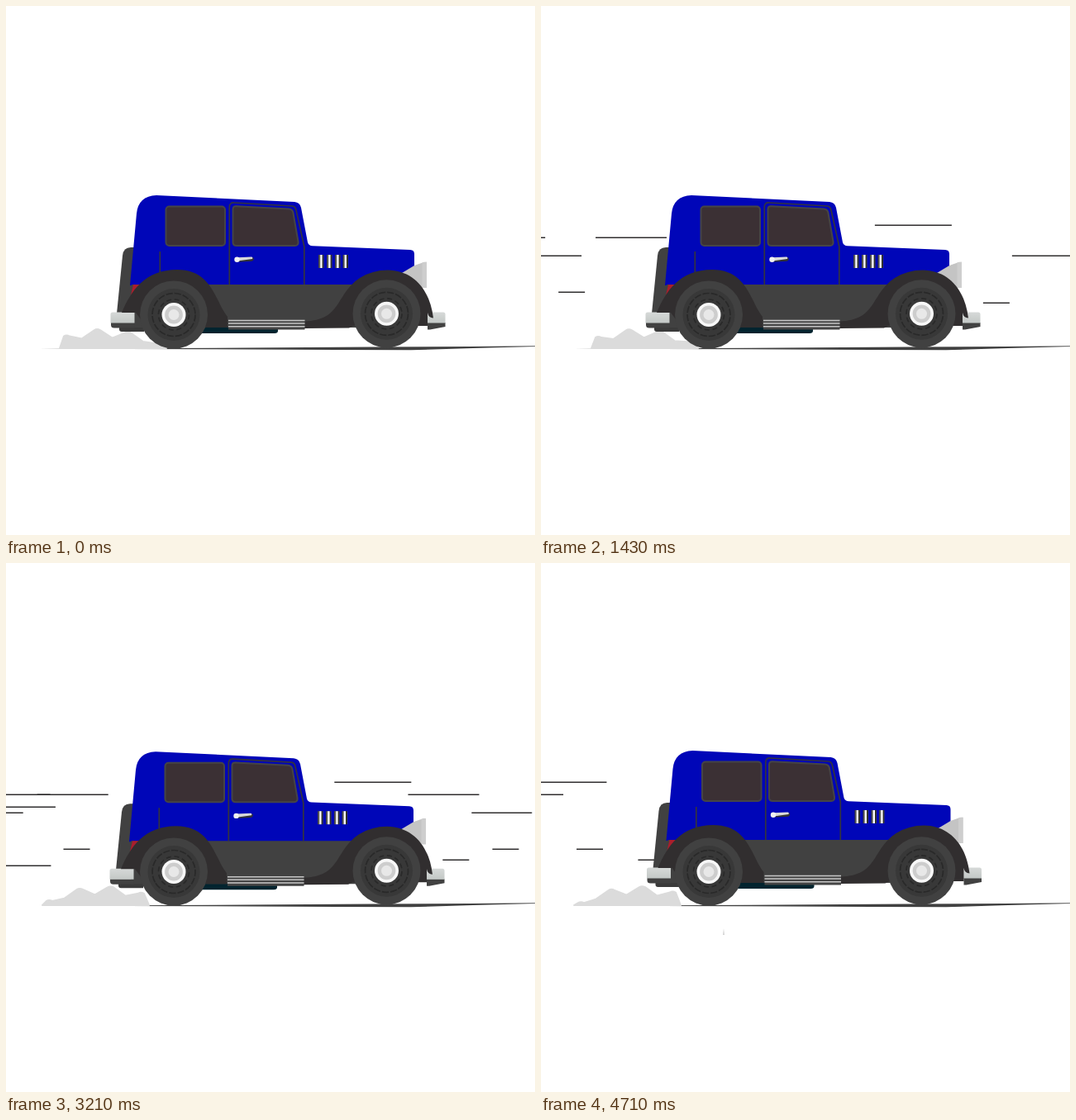
An HTML page for the animation above (4780 ms loop, 640 px wide and 640 px high).

```html
<!DOCTYPE html>
<html lang="en">
<head>
<meta charset="utf-8">
<title>Speeding car</title>
<style>
  html, body { margin: 0; height: 100%; overflow: hidden; background: #fff; }
  svg { display: block; width: 100%; height: 100%; }
</style>
</head>
<body>
<svg viewBox="0 0 640 640">
  <defs>
    <linearGradient id="chrome">
      <stop offset="0" stop-color="#333"/><stop offset=".25" stop-color="#666"/>
      <stop offset=".45" stop-color="#fff"/><stop offset=".65" stop-color="#fff"/>
      <stop offset=".75" stop-color="#222"/><stop offset="1" stop-color="#444"/>
    </linearGradient>
    <linearGradient id="bumper" x2="0" y2="1">
      <stop offset="0" stop-color="#d6d9d8"/><stop offset="1" stop-color="#c3c8c6"/>
    </linearGradient>
    <g id="wheel">
      <circle r="41" fill="#414141"/>
      <circle r="31.5" fill="#383838"/>
      <g class="spin" fill="none" stroke="#292929" stroke-width="1.7">
        <circle r="26" stroke-dasharray="8.2 2"/>
        <circle r="18.5" stroke-dasharray="6 3.7"/>
      </g>
      <circle r="14.5" fill="#f8f8f8"/>
      <circle r="8.7" fill="#e8e8e8" stroke="#cdcdcd" stroke-width="4.4"/>
    </g>
  </defs>

  <g id="lines" fill="none" stroke="#302e2f" stroke-width="1.4"></g>
  <path d="M40 414.7 L200 414 L440 412.5 L560 412 L640 411.3 V411.9 L565 414 L490 416.3 L400 416 L250 415.2Z" fill="#414141"/>
  <path id="smoke" fill="#dbdbdb" stroke="#dbdbdb" stroke-width="2" stroke-linejoin="round"/>
  <path id="fleck" fill="#d4d4d4"/>

  <g id="car">
    <path d="M236 388 H329 V393 Q329 396 325 396 H236Z" fill="#02242f"/>
    <path d="M137 388 H167 V394 H140 Q137 394 137 391Z" fill="#3a3a3a"/>
    <path d="M155 383 H166 V388 H155Z" fill="#312e2f"/>
    <path d="M134 372 L141 302 Q142 292 151 292 H160 V372Z" fill="#414141"/>
    <path d="M150 338 L158 251 Q160 230 182 229 L349 237 Q355.500 237.500 357 244 L365 286 Q366 290 371 290.300 L489 295 Q494 295.200 494 300 V338Z" fill="#0006b8"/>
    <path d="M152 337 H440 V389 H152Z" fill="#414141"/>
    <path d="M151 350 L154 337 H166Z" fill="#a91e2d"/>

    <g fill="#3b3034" stroke="#454447" stroke-width="2">
      <rect x="193.500" y="242.500" width="71.500" height="47.500" rx="4"/>
      <path d="M274.500 246 Q274.500 242 278.500 242.200 L342 245.500 Q346.500 246 347.300 249.500 L353.500 285 Q354 290 349.500 290 H279 Q274.500 290 274.500 286Z"/>
    </g>
    <path d="M186.300 297 V322 M270.300 337 V243 Q270.300 237.600 276 238 L346 242 Q350 242.300 351 247 L360.800 291 V337" fill="none" stroke="#34343f" stroke-width="1.700"/>
    <path d="M282 309.500 L297 308.800 Q300.500 308 299.500 304.500 L282 306Z" fill="#333"/>
    <path d="M280 304.300 L297 303.500 Q299 304 298 306 L280 308.500Z" fill="#d9d9d9"/>
    <circle cx="279.500" cy="306.700" r="3.200" fill="#f1f1f1"/>
    <g fill="url(#chrome)">
      <rect x="378" y="301" width="6.500" height="16"/><rect x="388" y="301" width="6.500" height="16"/>
      <rect x="398" y="301" width="6.500" height="16"/><rect x="407.500" y="301" width="6.500" height="16"/>
    </g>

    <path d="M479 323 L494 314 L506 309.700 H509 V341 H500Z" fill="#c4c4c4"/>
    <path d="M503.500 310.500 L509 309.700 V341 H503.500Z" fill="#cecece"/>
    <path d="M127 383 H155.500 V389.500 H131 Q127 389.500 127 386Z M510 383 H531.500 V388 L513 391.500 H510Z" fill="#414141"/>
    <path d="M126.500 383.500 V373 Q126.500 370.500 129 370.500 H155.500 V383.500Z M510 383.500 V370.500 H529 Q531.500 370.500 531.500 373 V383.500Z" fill="url(#bumper)"/>
    <g fill="#312e2f">
      <path d="M140 371 C151 345 168 319 207 319 C250 319 253 358 268 376 V389 H240 L166 383 L157 371Z"/>
      <path d="M361 390 V381.500 C407 380 398 349 428 329 Q443 319.500 462 319.500 C493 320 513 343 517 377.500 Q511 377 510 371 V387 H420 L415 389.500Z"/>
    </g>
    <path d="M269 379 H361.500 V391.500 H269Z" fill="#454545"/>
    <path d="M269 380.500 H361.500 M269 384 H361.500 M269 387.700 H361.500" stroke="#c6c6c6" stroke-width="1.500"/>
  </g>

  <use href="#wheel" x="203" y="373.500"/>
  <use href="#wheel" x="460.500" y="372.300"/>
</svg>

<script>
const LOOP = 4780, FRAMES = 67, BASE = 414;
const $ = selector => document.querySelector(selector);

// Each group of speed lines decelerates from the right edge; lines are [dx, y, length].
const groups = [
  { end: -130, span: 1100,
    starts: [-.47, 5.09, 12.55, 18.56, 23.21, 31.41, 36.56, 43.53, 51.17, 56, 61.67],
    lines: [[-166, 265.2, 93], [90, 280.2, 86], [0, 302.2, 73], [-35, 359.2, 32]] },
  { end: -60, span: 997,
    starts: [6.19, 12.01, 21.01, 28.41, 30.77, 38.5, 43.63, 52.1, 58.77],
    lines: [[-102, 280.2, 86], [0, 346.2, 32]] },
  { end: -110, span: 800,
    starts: [2.38, 7.84, 28.33, 38.5, 50.77, 55.5],
    lines: [[0, 295.2, 66], [-24.5, 366.2, 85]] }
];

// [step, dx, dy]
const bounce = [[0, 0, 0], [4, .5, -1], [8, 1, -2], [14, 1, -1.6], [20, 0, 0], [25, 0, -1.8],
  [29, .5, -2.7], [33, .5, -.8], [38, 0, -2], [45, -1, -.8], [52, -2.5, -2], [59, 0, -.8],
  [66, 1.5, -2], [67, 0, 0]];
// [step, distance drifted]
const drift = [[0, 0], [8, 76], [20, 189], [29, 277], [38, 365], [52, 491], [66, 617], [67, 629]];

function valueAt(keys, step, column) {
  const i = keys.findIndex(key => key[0] > step);
  const a = keys[i - 1], b = keys[i];
  return a[column] + (b[column] - a[column]) * (step - a[0]) / (b[0] - a[0]);
}

function speedLines(step) {
  let markup = '';
  for (const { end, span, starts, lines } of groups) {
    for (const start of starts) {
      const age = step - start;
      const opacity = Math.min(1, age, (9.75 - age) / 1.15);
      if (opacity <= 0) continue;
      const x = end + span * Math.exp(-.314 * age);
      const d = lines.map(([dx, y, length]) => `M${x + dx} ${y}h${length}`).join('');
      markup += `<path d="${d}" opacity="${opacity}"/>`;
    }
  }
  return markup;
}

const puffHeight = x => 24 * (1 - ((x - 115) / (x < 115 ? 75 : 84)) ** 2);

function smokePath(shift) {
  const gap = 37, peaks = [];
  for (let x = 110 - shift % gap - 3 * gap; x < 230; x += gap) {
    if (puffHeight(x) > 2) peaks.push(x);
  }
  let d = `M${peaks[0] - 8} ${BASE}`;
  peaks.forEach((x, i) => {
    const top = BASE - puffHeight(x) + 1;
    if (i) {
      const valley = x - gap / 2;
      d += `L${valley} ${BASE - .53 * puffHeight(valley)}`;
    }
    d += `L${x - 3} ${top + 1}Q${x} ${top - 1} ${x + 4} ${top + 1}`;
  });
  return d + `L${peaks.at(-1) + 10} ${BASE}Z`;
}

function fleckPath(phase) {
  if (phase > 16 && phase < 21) return 'M220 446L224 448V450H221Z';
  if (phase > 21 && phase < 28) return 'M221 442L222 450H220Z';
  return '';
}

function draw(now) {
  const step = Math.floor((now % LOOP) / LOOP * FRAMES + .03) % FRAMES;
  const shift = valueAt(drift, step, 1);
  $('#lines').innerHTML = speedLines(step);
  $('#smoke').setAttribute('d', smokePath(shift));
  $('#fleck').setAttribute('d', fleckPath(shift % 37));
  $('#car').setAttribute('transform', `translate(${valueAt(bounce, step, 1)} ${valueAt(bounce, step, 2)})`);
  $('.spin').setAttribute('transform', `rotate(${step * 360 * 17 / FRAMES})`);
  requestAnimationFrame(draw);
}
requestAnimationFrame(draw);
</script>
</body>
</html>
```
